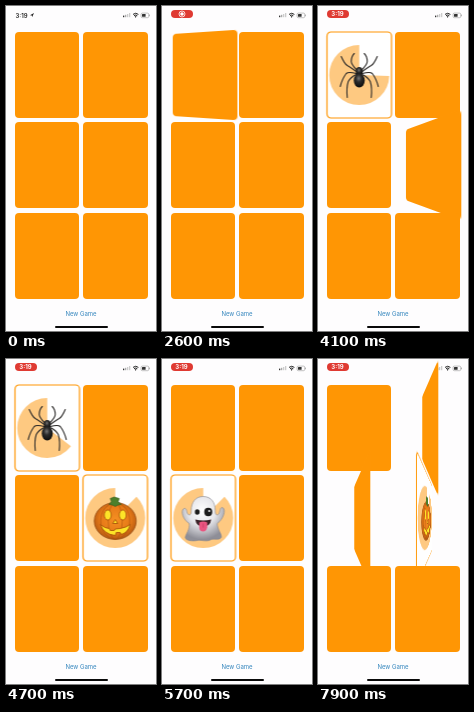
These frames come from a looping animation (150 by 325 pixels, 8 s). An HTML page:

```html
<!DOCTYPE html>
<html lang="en">
<head>
<meta charset="utf-8">
<title>Memory cards</title>
<style>
  html, body { margin: 0; width: 100%; height: 100%; overflow: hidden; background: #fefdfe; }
  #stage { position: relative; width: 150px; height: 325px; overflow: hidden; font-family: Inter, "Liberation Sans", sans-serif; }
  #stage > * { position: absolute; }
  .card { width: 64.5px; height: 86px; border-radius: 4px; background: #ff9604; }
  .card svg { display: none; width: 100%; height: 100%; overflow: visible; transform: scaleX(-1); }
  .card.up { background: #fff; }
  .card.up svg { display: block; }
  #bar { left: 0; top: 0; width: 150px; height: 20px; }
  #pill { left: 8.5px; top: 3.8px; width: 22px; height: 8.2px; border-radius: 4.1px; background: #df3a32; }
  .clock { left: 9.5px; top: 5.5px; font: 600 6px/7px Inter, sans-serif; color: #222; }
  #pill svg { position: absolute; left: 7px; top: .1px; width: 8px; height: 8px; }
  #pill span { position: absolute; inset: 0; text-align: center; font: 700 6px/8.2px Inter, sans-serif; color: #fff; }
  #again { left: 0; width: 150px; top: 304.3px; text-align: center; font-size: 6px; line-height: 8px; color: #3486bd; }
  #home { left: 48.5px; top: 319.7px; width: 53px; height: 2px; border-radius: 1px; background: #0a0a0a; }
</style>
</head>
<body>
<div id="stage">
  <svg id="bar" viewBox="0 0 150 20">
    <path id="arrow" d="M24 9.2 L28 7 L26.2 11 L25.8 9.4Z" fill="#222"/>
    <g fill="#333">
      <rect x="117" y="9.6" width="1.3" height="1.6"/>
      <rect x="119" y="8.8" width="1.3" height="2.4" fill="#aaa"/>
      <rect x="121" y="8" width="1.3" height="3.2" fill="#ccc"/>
      <rect x="123" y="7" width="1.3" height="4.2" fill="#ccc"/>
      <rect x="136" y="8" width="3.6" height="2.8" rx=".5"/>
      <rect x="143.2" y="8.6" width=".7" height="1.6" fill="#999"/>
    </g>
    <g fill="none" stroke="#222">
      <path d="M127 8.4 Q129.7 6.1 132.4 8.4 M128.1 9.7 Q129.7 8.3 131.3 9.7"/>
      <circle cx="129.7" cy="10.8" r=".4"/>
      <rect x="135.1" y="7.1" width="7.6" height="4.6" rx="1.2" stroke="#999" stroke-width=".6"/>
    </g>
  </svg>
  <div class="clock" id="clock">3:19</div>
  <div id="pill">
    <svg viewBox="0 0 8 8"><circle cx="4" cy="4" r="3" fill="none" stroke="#fff" stroke-width=".8"/><circle cx="4" cy="4" r="1.8" fill="#fff"/></svg>
    <span>3:19</span>
  </div>
  <div id="again">New Game</div>
  <div id="home"></div>
</div>

<svg width="0" height="0" style="position:absolute">
  <defs>
    <radialGradient id="rind" cx=".5" cy=".45" r=".6">
      <stop offset="0" stop-color="#f58f22"/><stop offset=".6" stop-color="#e67a18"/><stop offset="1" stop-color="#a8500f"/>
    </radialGradient>
    <radialGradient id="sheet" cx=".47" cy=".32" r=".65">
      <stop offset="0" stop-color="#fff"/><stop offset=".5" stop-color="#e6e6ea"/><stop offset="1" stop-color="#8e8e97"/>
    </radialGradient>
    <radialGradient id="shell" cx=".45" cy=".35" r=".65">
      <stop offset="0" stop-color="#777"/><stop offset=".4" stop-color="#2c2c2c"/><stop offset="1" stop-color="#0c0c0c"/>
    </radialGradient>

    <g id="spider">
      <g id="legs" fill="none" stroke="#2b2928" stroke-width="1.1" stroke-linecap="round">
        <path d="M2 -5 Q8 -11 8 -14 Q8 -19 5 -22"/>
        <path d="M3 -4 Q10 -9 12 -10 Q15 -12 18 -19"/>
        <path d="M3 -2 Q11 -4 13 -2 Q17 3 19 11"/>
        <path d="M3 -1 Q9 2 11 6 Q13 12 12 22"/>
      </g>
      <use href="#legs" transform="scale(-1 1)"/>
      <ellipse cy="-4" rx="3.500" ry="4.500" fill="url(#shell)"/>
      <ellipse cy="5" rx="5.500" ry="7" fill="url(#shell)"/>
    </g>

    <g id="pumpkin">
      <ellipse cy="2.500" rx="21" ry="18.500" fill="url(#rind)" stroke="#8f4710" stroke-width=".7"/>
      <g fill="none" stroke="#a8500f" stroke-width=".8" opacity=".7">
        <ellipse cy="2.500" rx="14.500" ry="18.200"/>
        <ellipse cy="2.500" rx="7" ry="18.200"/>
      </g>
      <path d="M-6 -14 L-4 -17 L-5 -20 L-1 -21.500 L4 -20 L3 -17 L6 -14 L3 -13.500 L0 -12 L-3 -13.500Z" fill="#4a7f2b" stroke="#35591e" stroke-width=".6"/>
      <g fill="#fde428" stroke="#a34c08" stroke-width=".8" stroke-linejoin="round">
        <ellipse cx="-7.500" cy="-3.500" rx="3.500" ry="5"/>
        <ellipse cx="7.500" cy="-3.500" rx="3.500" ry="5"/>
        <path d="M0 1 L2.500 5 L-2.500 5Z"/>
        <path d="M-15 6 Q-10 10 -6 10 L-5 12 L-1 12 L0 10.500 L5 10 Q11 9 15 6 Q13 14 6 16 L5 14 L1 14 L0 17 Q-11 16 -15 6Z"/>
      </g>
    </g>

    <g id="ghost">
      <path d="M0 -22 C8 -22 12 -16 12 -8 C12 -4 13 -3 15 -4 C17 -5 16 -11 19 -11 C23 -10 21 0 14 5 C14 11 19 16 18 19 C16 22 11 20 8 21 C3 24 -2 21 -6 22 C-11 23 -18 22 -18 19 C-18 16 -13 11 -14 5 C-21 1 -23 -9 -19 -10 C-16 -11 -17 -5 -15 -4 C-13 -3 -12 -4 -12 -8 C-12 -16 -8 -22 0 -22Z" fill="url(#sheet)" stroke="#85858e" stroke-width=".6"/>
      <ellipse cx="-6" cy="-6.500" rx="2.400" ry="2.800" fill="#1c1c1c"/>
      <ellipse cx="5" cy="-6.500" rx="4" ry="4.200" fill="#1c1c1c"/>
      <circle cx="6" cy="-7.500" r="1" fill="#fff"/>
      <path d="M-8 1 Q0 3 8 1 Q7 8 0 8 Q-7 8 -8 1Z" fill="#3a2227"/>
      <path d="M-4 4 Q0 2 4 4 L4 9 Q3 13 0 13 Q-4 13 -4 9Z" fill="#ea5580"/>
      <path d="M0 5 V9" stroke="#c73c64" stroke-width=".8"/>
    </g>
  </defs>
</svg>

<script>
const LOOP = 8000, FLIP = 750, BONUS = 6000;

// Column, row, picture, then times turned up and down in turn
const deck = [
  [0, 0, 'spider', 2570, 4950],
  [1, 0, 'pumpkin', 6250, 7475],
  [0, 1, 'ghost', 4950, 7475],
  [1, 1, 'pumpkin', 3950, 4950, 7475],
  [0, 2],
  [1, 2]
];

const stage = document.getElementById('stage');
const get = id => document.getElementById(id);
const clamp = x => Math.max(0, Math.min(1, x));

const cards = deck.map(([col, row, face, ...turns]) => {
  const el = document.createElement('div');
  el.className = 'card';
  el.style.left = 8.6 + col * 68.5 + 'px';
  el.style.top = 26 + row * 90.4 + 'px';
  if (face) el.innerHTML = `<svg viewBox="0 0 64.5 86">
    <circle class="pie" cx="32.25" cy="43" r="15" pathLength="360" fill="none" stroke="#fec981" stroke-width="30" transform="rotate(-90 32.25 43)"/>
    <use href="#${face}" x="32.25" y="43.5"/>
    <rect width="64.5" height="86" rx="4" fill="none" stroke="#ff9604" stroke-width="1.2"/>
  </svg>`;
  stage.insertBefore(el, get('again'));
  return { el, turns, pie: el.querySelector('.pie') };
});

function drawCard({ el, turns, pie }, t) {
  if (!pie) return;
  let angle = 0, shownAt = 0;
  turns.forEach((start, i) => {
    if (t < start) return;
    const up = i % 2 === 0;
    const p = clamp((t - start) / FLIP);
    angle = 180 * (up ? p : 1 - p);
    if (up) shownAt = start;
  });
  // A flat card needs no perspective, only the mirrored face
  el.style.transform = angle ? `perspective(86px) rotateY(${-angle}deg)` : 'none';
  el.classList.toggle('up', angle > 90);
  const gap = 360 * clamp((t - shownAt) / BONUS);
  pie.setAttribute('stroke-dasharray', `0 ${gap} ${360 - gap} 0`);
}

function draw(t) {
  cards.forEach(card => drawCard(card, t));
  const rec = clamp((t - 500) / 300);
  const time = clamp((t - 3800) / 300);
  get('pill').style.opacity = rec;
  get('clock').style.opacity = get('arrow').style.opacity = 1 - rec;
  get('pill').querySelector('svg').style.opacity = 1 - time;
  get('pill').querySelector('span').style.opacity = time;
}

const began = performance.now();
function tick() {
  draw((performance.now() - began) % LOOP);
  requestAnimationFrame(tick);
}
tick();
</script>
</body>
</html>
```
